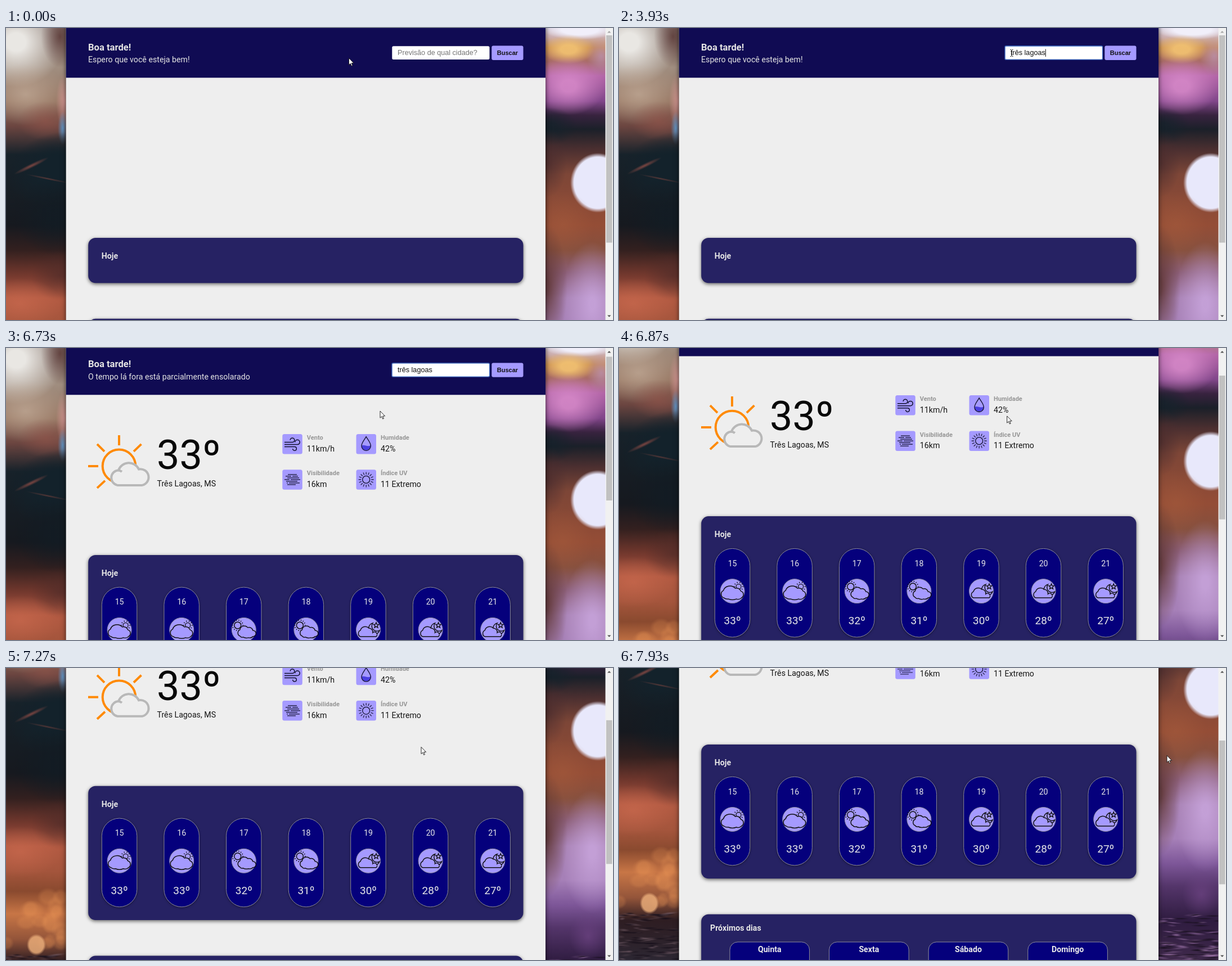
Recreate the animation shown at these times as an HTML page with a canvas. Size 1079x519 px, loop 8 s.

```html
<!DOCTYPE html>
<html lang="pt-BR">
<head>
<meta charset="utf-8">
<style>
html, body { margin: 0; width: 100%; height: 100%; overflow: hidden; background: #eee; }
canvas { display: block; }
</style>
</head>
<body>
<canvas id="stage" width="1079" height="519"></canvas>
<script>
const W = 1079, H = 519, LOOP = 8000, STEP = 1000 / 15;
const ctx = document.getElementById('stage').getContext('2d');
const ROBOTO = 'Roboto, sans-serif', ARIAL = '"Liberation Sans", Arial, sans-serif';
const LILAC = '#a59aff', NAVY = '#05007c', CARD = '#262263', PAPER = '#eeeeee', INK = '#10102a';

const clamp = v => Math.max(0, Math.min(1, v));
const easeInOut = p => p < .5 ? 4 * p ** 3 : 1 - 4 * (1 - p) ** 3;

function text(str, x, y, size, color, { bold = false, family = ROBOTO, align = 'left' } = {}) {
  ctx.font = `${bold ? 'bold ' : ''}${size}px ${family}`;
  ctx.fillStyle = color;
  ctx.textAlign = align;
  ctx.fillText(str, x, y);
}

function box(x, y, w, h, r, fill, border) {
  ctx.beginPath();
  ctx.roundRect(x, y, w, h, r);
  ctx.fillStyle = fill;
  ctx.fill();
  if (border) {
    ctx.strokeStyle = border;
    ctx.lineWidth = 1;
    ctx.stroke();
  }
}

function shadowed(blur, dy, color, draw) {
  ctx.save();
  ctx.shadowBlur = blur;
  ctx.shadowOffsetY = dy;
  ctx.shadowColor = color;
  draw();
  ctx.restore();
}

function line(d, color, width, fill) {
  const path = new Path2D(d);
  if (fill) {
    ctx.fillStyle = fill;
    ctx.fill(path);
  }
  ctx.strokeStyle = color;
  ctx.lineWidth = width;
  ctx.stroke(path);
}

function rays(x, y, r1, r2, count, color, width) {
  ctx.strokeStyle = color;
  ctx.lineWidth = width;
  ctx.beginPath();
  for (let i = 0; i < count; i++) {
    const a = i / count * Math.PI * 2, c = Math.cos(a), s = Math.sin(a);
    ctx.moveTo(x + c * r1, y + s * r1);
    ctx.lineTo(x + c * r2, y + s * r2);
  }
  ctx.stroke();
}

function ring(x, y, r, color, width, fill) {
  ctx.beginPath();
  ctx.arc(x, y, r, 0, Math.PI * 2);
  if (fill) {
    ctx.fillStyle = fill;
    ctx.fill();
  }
  ctx.strokeStyle = color;
  ctx.lineWidth = width;
  ctx.stroke();
}

// Blurred city lights on both sides of the page
function paintBackdrop() {
  const layer = new OffscreenCanvas(1066, 760), g = layer.getContext('2d');
  let seed = 7;
  const rnd = () => (seed = seed * 16807 % 2147483647) / 2147483647;
  const strip = (x, w, stops) => {
    const grad = g.createLinearGradient(0, 0, 0, 760);
    stops.split(' ').forEach(s => {
      const [y, c] = s.split(':');
      grad.addColorStop(y / 760, c);
    });
    g.fillStyle = grad;
    g.fillRect(x, 0, w, 760);
  };
  const blob = (x, y, rx, ry, color, core = .2, alpha = 1, turn = 0) => {
    g.save();
    g.translate(x, y);
    g.rotate(turn);
    g.scale(rx, ry);
    g.globalAlpha = alpha;
    const grad = g.createRadialGradient(0, 0, 0, 0, 0, 1);
    grad.addColorStop(0, color);
    grad.addColorStop(core, color);
    grad.addColorStop(1, color + '00');
    g.fillStyle = grad;
    g.fillRect(-1, -1, 2, 2);
    g.restore();
  };
  strip(0, 533, '0:#8f8079 70:#a08e80 130:#94735f 175:#6b4540 225:#17222a 350:#16191f 395:#33201f 440:#75392e 480:#b25a42 525:#a4553c 560:#8a4a2f 600:#c87646 645:#94553a 685:#2e1d22 760:#2c2733');
  blob(18, 25, 85, 80, '#e9e7e3', .2);
  blob(35, 118, 75, 55, '#bfa895', 0, .8);
  blob(96, 15, 34, 55, '#5a3836', 0, .85);
  blob(70, 165, 50, 35, '#8f544a', 0, .7);
  blob(104, 130, 15, 50, '#dd9a9a', 0, .8);
  blob(101, 178, 9, 30, '#5f9bd0', 0, .9);
  blob(85, 250, 85, 62, '#13222b', .35, 1, -.35);
  blob(45, 245, 34, 4, '#9a5048', .1, .7, -.45);
  blob(75, 268, 40, 2, '#70403c', .1, .7, .2);
  blob(90, 335, 75, 70, '#121c24', .2, .8);
  blob(95, 440, 50, 45, '#4a2a28', 0, .6);
  blob(25, 490, 75, 45, '#c9694e', 0, .7);
  for (let i = 0; i < 16; i++)
    blob(rnd() * 107, 565 + rnd() * 95, 10 + rnd() * 14, 10 + rnd() * 14, '#f09a58', .6, .22);
  blob(54, 655, 17, 19, '#e8ab78', .75, .85);

  strip(533, 533, '0:#d8cfdf 16:#cdb0b0 35:#c98d50 60:#a86a68 85:#b466a8 130:#81468a 155:#38233f 180:#1b2029 215:#4a2f30 260:#7d4637 350:#944d36 395:#85503f 435:#8c5f78 480:#a680b2 540:#a680b8 585:#7d5698 625:#54356a 685:#2f1c40 760:#402a4c');
  blob(1020, 3, 65, 18, '#f1effa', .5);
  blob(1000, 38, 46, 26, '#f2c272', .3, .9);
  blob(1058, 50, 26, 36, '#b98fae', 0, .8);
  blob(1000, 103, 66, 52, '#d88aca', .2, .85);
  blob(965, 175, 50, 34, '#16222b', .2, .8);
  blob(965, 240, 32, 60, '#4a2c2e', 0, .7);
  blob(1052, 275, 49, 53, '#e8e8fb', .86);
  blob(990, 350, 55, 60, '#a35a3c', 0, .6);
  blob(962, 460, 36, 110, '#5e3430', .1, .8);
  blob(1042, 490, 55, 110, '#cdaae2', .1, .75);
  blob(1035, 640, 34, 40, '#74488a', 0, .6);
  for (let i = 0; i < 90; i++) {
    const left = i % 2, y = 672 + rnd() * 86;
    blob((left ? 0 : 959) + rnd() * 107, y, 6 + rnd() * 14, 1 + rnd() * 2,
      left ? '#77606a' : '#b88ac4', .2, .2 + rnd() * .4, (rnd() - .5) * .3);
    blob((left ? 0 : 959) + rnd() * 107, y, 8 + rnd() * 14, 2, '#140d18', .2, .6);
  }
  return layer;
}
const backdrop = paintBackdrop();

function partlySunny() {
  const orange = '#ff8a05';
  ring(201, 215, 29.3, orange, 4);
  line('M201 160V178M146 215H164M162 176L175 189M240.500 176L227 189M162 254L176 241', orange, 4);
  line('M198 249A13.500 13.500 0 0 1 200 222.300A19.500 19.500 0 0 1 236 220.600A14.300 14.300 0 1 1 242 249Z', '#b8b8b8', 4, PAPER);
  line('M199 222.300Q203 222.500 206 225', '#b8b8b8', 4);
}

const detailIcons = {
  wind() {
    line('M-14-3H0A3.800 3.800 0 1 0-3.800-6.800M-14 1H9A4.200 4.200 0 1 0 4.800-3.200M-14 5H4A3.300 3.300 0 1 1 .700 8.300', INK, 1.5);
  },
  drop() {
    ctx.fillStyle = '#4a3fe0';
    ctx.fill(new Path2D('M-8 3C-4 0 3 6 8 2.500C8.500 14-8.500 14-8 3Z'));
    line('M0-13C-4-6-8.200-2-8.200 3.500A8.200 8.200 0 0 0 8.200 3.500C8.200-2 4-6 0-13Z', INK, 1.3);
  },
  haze() {
    line('M-8-9H8M-12-6H-2M0-6H10M-9-3H12M-14 0H-5M-3 0H14M-11 3H9M-6 6H13M-10 6H-8M-9 9H6', INK, 1.2);
  },
  uv() {
    ring(0, 0, 6.5, INK, 1.3);
    rays(0, 0, 9, 13.5, 16, INK, 1.1);
  }
};

const skyIcons = {
  cloudy() {
    ring(11, -8, 4.5, '#111', 1.3);
    rays(11, -8, 6.5, 8.8, 10, '#111', 1.2);
    line('M-15 12a7 7 0 0 1-1-13a12 11 0 0 1 21-4a8 8 0 0 1 10 5a6.500 6.500 0 0 1 1 12a7 5 0 0 1-9 2a12 7 0 0 1-14 0a8 5 0 0 1-8-2z', '#111', 1.5, LILAC);
  },
  sunny() {
    ring(-11, -8, 6, '#111', 1.5);
    rays(-11, -8, 8.3, 10.3, 14, '#111', 1.4);
    line('M-7 11a6 6 0 0 1 0-11a8 8 0 0 1 14-4a7 7 0 0 1 9 5a5.500 5.500 0 0 1 0 11a7 5 0 0 1-8 2a8 5 0 0 1-9-1a5 4 0 0 1-6-2z', '#111', 1.5, LILAC);
  },
  night() {
    line('M8-12A9 9 0 0 0 20 1A10 10 0 1 1 8-12Z', '#111', 1.5);
    line('M-14 12a6 6 0 0 1 0-11a9 9 0 0 1 15-4a7 7 0 0 1 7 8a4 4 0 0 1 6 7z', '#111', 1.5, LILAC);
    const star = Array.from({ length: 10 }, (_, i) => {
      const a = i * Math.PI / 5 - Math.PI / 2, r = i % 2 ? 2.2 : 5;
      return `${14 + r * Math.cos(a)} ${-8 + r * Math.sin(a)}`;
    });
    line(`M${star.join('L')}Z`, '#111', 1.4, LILAC);
  }
};

function at(x, y, draw) {
  ctx.save();
  ctx.translate(x, y);
  draw();
  ctx.restore();
}

const details = [
  ['wind', 'Vento', '11km/h'], ['drop', 'Humidade', '42%'],
  ['haze', 'Visibilidade', '16km'], ['uv', 'Índice UV', '11 Extremo']
];
const hours = [
  [33, 'cloudy'], [33, 'cloudy'], [32, 'sunny'], [31, 'sunny'],
  [30, 'night'], [28, 'night'], [27, 'night']
];

function drawWeather() {
  partlySunny();
  text('33º', 268, 220, 72, '#080808');
  text('Três Lagoas, MS', 268.5, 251, 14.2, '#161616');
  details.forEach(([icon, label, value], i) => {
    const x = 491.3 + i % 2 * 131.2, y = 158 + (i >> 1) * 63.3;
    box(x, y, 35.5, 35.5, 3.5, LILAC);
    at(x + 17.7, y + 17.7, detailIcons[icon]);
    text(label, x + 43.5, y + 10.2, 11.06, '#969696', { bold: true });
    text(value, x + 43.5, y + 31, 14.2, '#161616');
  });
}

function drawHours() {
  hours.forEach(([degrees, icon], i) => {
    const x = 170.3 + i * 110.6, mid = x + 31.3;
    shadowed(4, 1, '#0008', () => box(x, 430.3, 62.5, 157.5, 31.2, NAVY));
    box(x, 430.3, 62.5, 157.5, 31.2, NAVY, '#8f8d9c');
    text(15 + i, mid, 461.5, 14.2, '#e9e9e9', { align: 'center' });
    ring(mid, 506, 21.5, '#8f8d9c', 1, LILAC);
    at(mid, 506, skyIcons[icon]);
    text(degrees + 'º', mid, 565.2, 19, '#e9e9e9', { align: 'center' });
  });
}

function drawDays() {
  text('Próximos dias', 162, 704, 14.2, '#e6e6e6', { bold: true });
  ['Quinta', 'Sexta', 'Sábado', 'Domingo'].forEach((day, i) => {
    const x = 197 + i * 176.6;
    box(x, 724, 141.6, 120, 14, NAVY, '#8f8d9c');
    text(day, x + 70.8, 742, 14.2, '#e9e9e9', { bold: true, align: 'center' });
  });
}

// [time, letters shown]
const keystrokes = [[2200, 1], [2270, 2], [2930, 3], [3000, 4], [3200, 5], [3400, 6],
  [3470, 7], [3670, 8], [3800, 10], [3930, 11]];
const caretOn = [[1400, 2000], [2200, 2800], [2930, 5530], [6030, 6670]];

function drawSearch(t) {
  const typed = keystrokes.reduce((n, [when, count]) => t >= when ? count : n, 0);
  const query = 'três lagoas'.slice(0, typed);
  const focused = t >= 1330;
  box(686.3, 32.3, 173.2, 23.7, 2.5, '#fff');
  if (focused) {
    ctx.beginPath();
    ctx.roundRect(686, 32, 173.6, 24.2, 2);
    ctx.strokeStyle = '#3f6fc8';
    ctx.lineWidth = 1.3;
    ctx.stroke();
  }
  if (typed) text(query, 696, 48.3, 12.64, '#111', { family: ARIAL });
  else text('Previsão de qual cidade?', 696, 48.3, 12.64, '#757575', { family: ARIAL });
  if (caretOn.some(([from, to]) => t >= from && t < to)) {
    ctx.font = `12.64px ${ARIAL}`;
    ctx.fillStyle = '#111';
    ctx.fillRect(696 + ctx.measureText(query).width, 37.5, 1, 13.5);
  }
  box(863.3, 31.5, 56.2, 25.4, 3, LILAC);
  text('Buscar', 891.4, 48.2, 11.06, '#111', { bold: true, family: ARIAL, align: 'center' });
}

function drawHeader(t, loaded) {
  ctx.fillStyle = '#100b53';
  ctx.fillRect(106.7, 0, 852.3, 88.4);
  text('Boa tarde!', 146, 39.5, 16.6, '#e4e4e4', { bold: true });
  text(loaded ? 'O tempo lá fora está parcialmente ensolarado' : 'Espero que você esteja bem!',
    146, 61, 14.2, '#e4e4e4');
  drawSearch(t);
}

// Three wheel notches
const scrollAt = t => [6670, 6884, 7203]
  .reduce((sum, start) => sum + 79 * easeInOut(clamp((t - start) / 270)), 0);

const pointer = [[760, 609, 53], [1100, 680, 49], [1400, 742, 44.5], [1640, 742, 44.5], [1800, 698, 44.5],
  [5700, 698, 44.5], [5870, 632, 78], [6000, 570, 102], [6200, 634, 107], [6370, 634, 107],
  [6530, 648, 107], [6730, 663, 111], [7000, 713, 129], [7270, 737.5, 140], [7470, 742, 138],
  [7600, 800, 118], [7730, 880, 104], [7830, 938, 125], [7930, 973.5, 155]];

function pointerAt(t) {
  const i = pointer.findIndex(p => p[0] > t);
  if (i === 0) return pointer[0].slice(1);
  if (i < 0) return pointer.at(-1).slice(1);
  const [t0, x0, y0] = pointer[i - 1], [t1, x1, y1] = pointer[i];
  const p = (t - t0) / (t1 - t0);
  return [x0 + (x1 - x0) * p, y0 + (y1 - y0) * p];
}

function drawPointer(t, scroll) {
  const [x, y] = pointerAt(t);
  const inside = (l, top, r, b) => x > l && x < r && y + scroll > top && y + scroll < b;
  const overText = inside(686, 32, 860, 56) || inside(660, 222, 745, 255);
  at(x, y, () => {
    if (overText) line('M-2.500-6H-.800M.800-6H2.500M0-5.500V5.500M-2.500 6H-.800M.800 6H2.500', '#111', 1.1);
    else line('M.500.500V12.700L3.300 10.100L5.100 14.500L7 13.700L5.200 9.400H9.100Z', '#111', .9, '#fff');
  });
}

function drawScrollbar(scroll, loaded) {
  ctx.fillStyle = '#f1f1f1';
  ctx.fillRect(1065.5, 0, 14, H);
  ctx.fillStyle = '#c1c1c1';
  ctx.fillRect(1067, 13 + scroll * .489, 10.5, loaded ? 255.5 : 368.5);
  const arrow = (y, dir, color) => {
    ctx.fillStyle = color;
    ctx.fill(new Path2D(`M1069 ${y}h6.400l-3.200 ${dir * 3.2}z`));
  };
  arrow(8.5, -1, scroll > 0 ? '#505050' : '#a3a3a3');
  arrow(510.5, 1, '#505050');
}

function render(t) {
  const loaded = t >= 4600, scroll = scrollAt(t);
  ctx.clearRect(0, 0, W, H);
  ctx.save();
  ctx.translate(0, -scroll);
  ctx.drawImage(backdrop, 0, 0);
  shadowed(8, 0, '#000b', () => box(106.7, -20, 852.3, 1100, 0, PAPER));
  drawHeader(t, loaded);
  const todayHeight = loaded ? 238.3 : 80.3;
  shadowed(6, 2, '#0009', () => {
    box(146.2, 373, 773.3, todayHeight, 13, CARD);
    box(146.2, 373 + todayHeight + 63.5, 773.3, 300, 13, CARD);
  });
  text('Hoje', 169.8, 410, 14.2, '#e6e6e6', { bold: true });
  if (loaded) {
    ctx.globalAlpha = clamp((t - 4540) / 530);
    drawWeather();
    drawHours();
    drawDays();
    ctx.globalAlpha = 1;
  }
  ctx.restore();
  drawScrollbar(scroll, loaded);
  drawPointer(t, scroll);
}

function tick() {
  const t = performance.now() % LOOP;
  render(Math.floor((t + 4) / STEP) * STEP + 5);
  requestAnimationFrame(tick);
}
tick();
</script>
</body>
</html>
```
